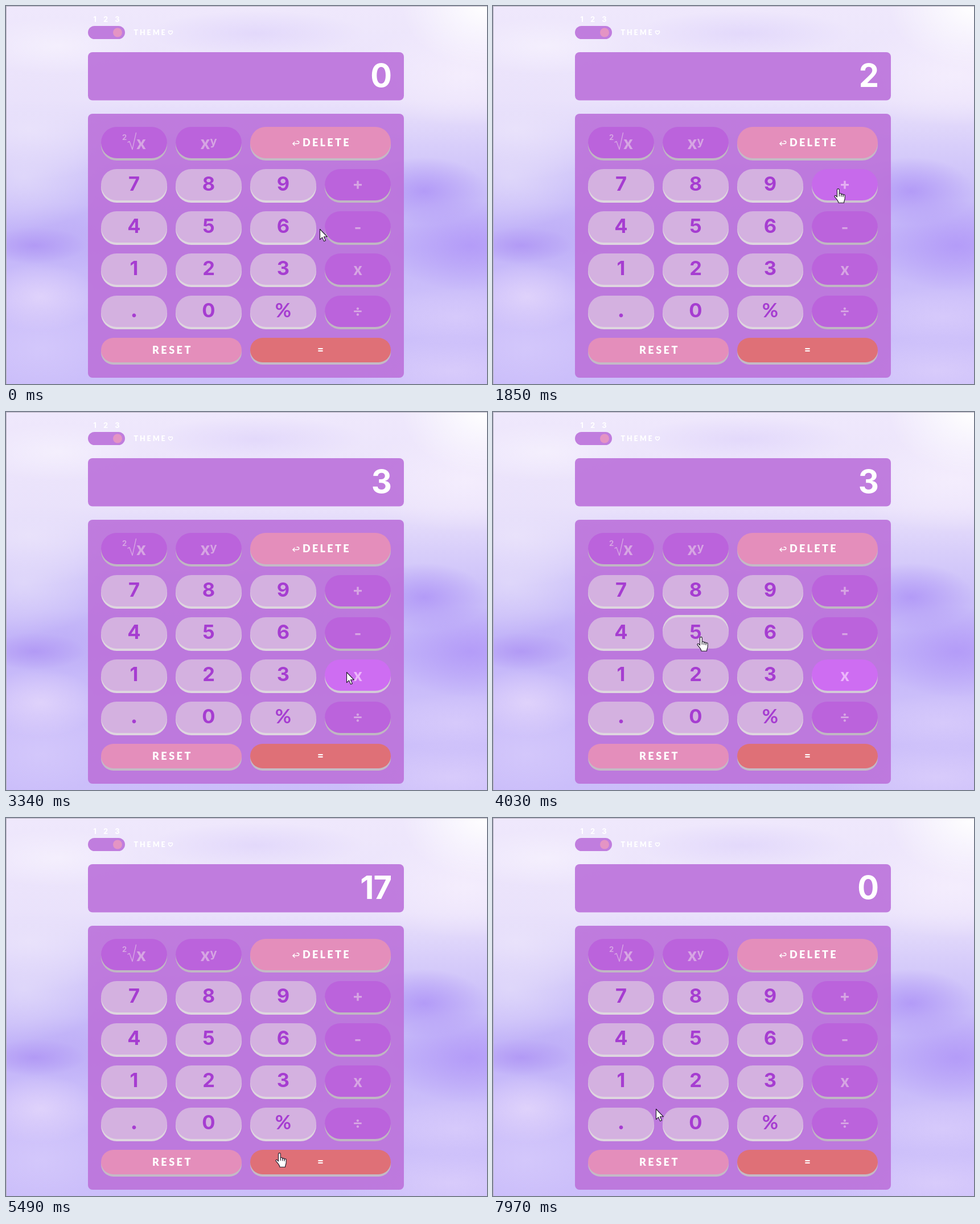
An HTML page for the animation above (8000 ms loop, 845x663 px).

```html
<!DOCTYPE html>
<html lang="en">
<head>
<meta charset="utf-8">
<title>Calculator</title>
<style>
html, body { margin: 0; width: 100%; height: 100%; overflow: hidden; }
body {
  background:
    linear-gradient(#b8b2c2, #b8b2c2) 0 0 / 100% 1px no-repeat,
    linear-gradient(#b8b2c2, #b8b2c2) 0 0 / 1px 100% no-repeat,
    radial-gradient(150px 110px at 845px 0, #fff, #fff0),
    radial-gradient(190px 40px at 440px 48px, #e3d9fb, #e3d9fb00),
    radial-gradient(150px 50px at 90px 70px, #f4effd, #f4effd00),
    radial-gradient(200px 90px at 810px 120px, #f4edfd, #f4edfd00),
    radial-gradient(190px 90px at 40px 215px, #e9e2fb, #e9e2fb00),
    radial-gradient(150px 90px at 30px 300px, #ded6fa, #ded6fa00),
    radial-gradient(90px 32px at 50px 420px, #b29af5, #b29af500),
    radial-gradient(130px 60px at 100px 405px, #bfaff7, #bfaff700),
    radial-gradient(100px 60px at 60px 510px, #dfd2fb, #dfd2fb00),
    radial-gradient(110px 60px at 735px 325px, #b39bf7, #b39bf700),
    radial-gradient(150px 80px at 815px 420px, #b49cf8, #b49cf800),
    radial-gradient(150px 50px at 790px 545px, #d6c9fb, #d6c9fb00),
    radial-gradient(200px 60px at 780px 640px, #d8cbfb, #d8cbfb00),
    radial-gradient(120px 70px at 60px 600px, #d3c7fb, #d3c7fb00),
    linear-gradient(#efe8fc, #eae2fb 25%, #d8cefa 37%, #c9bdf9 50%, #c3b5f9 64%, #cdc0fa 78%, #cbbefa);
}
svg { position: absolute; left: 0; top: 0; display: block; }
text { font-family: Inter, "Open Sans", sans-serif; font-weight: 700; }
.label { font-family: Lato, "Open Sans", sans-serif; font-weight: 900; fill: #fff; }
.lato { font-family: Lato, "Open Sans", sans-serif; }
.panel { fill: rgba(188, 114, 219, .9); }
.line { fill: none; stroke-linecap: round; stroke-linejoin: round; }
.cursor { fill: #fff; stroke: #1c1626; stroke-width: 1.1; stroke-linejoin: round; }
</style>
</head>
<body>
<svg id="stage" width="845" height="663" viewBox="0 0 845 663">
  <g fill="#fff" font-size="13" text-anchor="middle">
    <text x="156" y="27.500">1</text><text x="175" y="27.500">2</text><text x="195.500" y="27.500">3</text>
  </g>
  <rect class="panel" x="144" y="35" width="65" height="23" rx="11.500"/>
  <circle cx="196" cy="46.500" r="8" fill="#e494c4"/>
  <text class="label" x="224.500" y="50.500" font-size="12.500" letter-spacing="2.900">THEME</text>
  <path class="line" stroke="#fff" stroke-width="1.500" d="M289 49.800C283 46 285.500 41.500 289 44.300C292.500 41.500 295 46 289 49.800Z"/>
  <rect class="panel" x="144" y="81" width="555" height="84.500" rx="8"/>
  <text id="screen" x="677" y="142" font-size="56" text-anchor="end" letter-spacing="-1" fill="#fff">0</text>
  <rect class="panel" x="144" y="189" width="555" height="463" rx="8"/>
  <g id="keys"></g>
  <g id="pointer">
    <path id="arrow" class="cursor" d="M.5 .5V18.700L4.600 14.900L7.600 21.600L10.400 20.400L7.500 13.700H13.200Z"/>
    <g id="hand" transform="translate(-7 0)">
      <path class="cursor" d="M5.500 15V2.500a1.900 1.900 0 0 1 3.800 0V10a1.700 1.700 0 0 1 3.400 .4v.6a1.700 1.700 0 0 1 3.300 .4v.8a1.600 1.600 0 0 1 3.200 .5V17c0 3.500-1.700 4.500-1.700 8.200H8c0-2.200-1.500-3.700-3-6L1.200 14.700c-1-1.700 1-3.100 2.300-1.800z"/>
      <path class="cursor" style="fill:none" d="M9.300 10v4M12.700 11v3.500M16 12v3"/>
    </g>
  </g>
</svg>
<script>
const $ = id => document.getElementById(id);
const keys = {};
const cols = [167, 298, 429, 560];
const rows = [212, 286, 360, 434, 508, 582];
const kinds = {
  num: ['#d4b1e0', '#ded6df', '#a63dd1'],
  op: ['#bb63dc', '#c0b7c3', '#d6a5e3'],
  pink: ['#e48ebb', '#c4bac6', '#fff'],
  red: ['#df7077', '#c4bac6', '#fff']
};

function make(tag, attrs, parent, text) {
  const el = document.createElementNS('http://www.w3.org/2000/svg', tag);
  for (const a in attrs) el.setAttribute(a, attrs[a]);
  if (text) el.textContent = text;
  return parent.appendChild(el);
}

function addKey(name, kind, col, row, span = 1) {
  const [face, edge, ink] = kinds[kind];
  const x = cols[col], y = rows[row], w = span * 131 - 15, h = row === 5 ? 43 : 55;
  const g = make('g', { fill: ink }, $('keys'));
  const box = { x, width: w, height: h, rx: h / 2 };
  const shade = make('rect', { ...box, y: y + 4, fill: edge }, g);
  make('rect', { ...box, y, fill: face }, g);
  keys[name] = { g, shade, x, y, w, h };
  return g;
}

function put(g, text, x, y, size, attrs) {
  make('text', { x, y, 'font-size': size, 'text-anchor': 'middle', ...attrs }, g, text);
}

const root = addKey('root', 'op', 0, 0);
put(root, '2', 208, 235, 13);
put(root, 'x', 237.5, 251, 30);
make('path', { class: 'line', stroke: '#d6a5e3', 'stroke-width': 1.4, d: 'M214 239L217 237.500L222 251.500L228.500 222.500' }, root);

const power = addKey('power', 'op', 1, 0);
put(power, 'x', 350, 251, 30);
put(power, 'y', 364.5, 244, 20);

const del = addKey('delete', 'pink', 2, 0, 2);
put(del, 'DELETE', 521, 246, 18, { class: 'label', 'text-anchor': 'start', 'letter-spacing': 3.3 });
make('path', { class: 'line', stroke: '#fff', 'stroke-width': 1.4, d: 'M507 238.500L503.800 241.500L507 244.500M504 241.500H512.500A2.200 2.200 0 0 0 512.500 237H511' }, del);

['789', '456', '123', '.0%'].forEach((line, r) => [...line].forEach((ch, c) => {
  const g = addKey(ch, 'num', c, r + 1);
  const plain = ch >= '0' && ch <= '9';
  put(g, ch, cols[c] + 58, rows[r + 1] + 38, ch === '.' ? 44 : 34.5, plain ? {} : { class: 'lato' });
}));

[['+', 36], ['-', 38], ['x', 38], ['÷', 36]].forEach(([ch, dy], r) => {
  const g = addKey(ch === 'x' ? 'times' : ch, 'op', 3, r + 1);
  put(g, ch, 618, rows[r + 1] + dy, 28, ch === '÷' ? { style: 'font-weight:600' } : {});
});

put(addKey('reset', 'pink', 0, 5, 2), 'RESET', 257, 610, 18, { class: 'label', 'text-anchor': 'start', 'letter-spacing': 3.5 });
put(addKey('equals', 'red', 2, 5, 2), '=', 552.5, 610, 18, { class: 'label' });

// Pointer moves: start, end, steps, target x, target y
const moves = [
  [70, 540, 7, 381, 454],
  [930, 1700, 11, 606, 320],
  [2080, 2550, 7, 500, 463],
  [2870, 3105, 4, 598, 456],
  [3520, 3880, 6, 365, 394],
  [4260, 4810, 8, 488, 594],
  [5250, 5490, 4, 480, 587],
  [5950, 6570, 9, 304, 592],
  [7800, 7970, 3, 286, 510]
];
// Key presses: down, up, key
const presses = [
  [620, 700, '2'], [2630, 2720, '3'], [4030, 4110, '5'],
  [4970, 5020, 'equals'], [6870, 7020, 'reset']
];
const readings = [[0, '0'], [700, '2'], [2720, '3'], [4110, '5'], [5020, '17'], [7020, '0']];

const stepped = (t, start, end, n) =>
  t < start ? 0 : Math.min(n, Math.floor((t - start) * (n - 1) / (end - start) + 1e-6) + 1) / n;

function pointerAt(t) {
  let x = 551, y = 391;
  for (const [start, end, n, tx, ty] of moves) {
    const p = stepped(t, start, end, n);
    x += (tx - x) * p;
    y += (ty - y) * p;
  }
  return [x, y];
}

function draw(t) {
  $('screen').textContent = readings.filter(r => r[0] <= t).pop()[1];

  const swap = stepped(t, 3184, 3340, 3);
  const lit = {
    '+': stepped(t, 1770, 1930, 3) * (1 - swap),
    times: t < 5020 ? swap : 0
  };
  for (const k in lit) keys[k].g.style.filter = lit[k] ? `brightness(${1 + lit[k] * .1})` : 'none';

  for (const [down, up, k] of presses) {
    const { shade, y } = keys[k];
    shade.setAttribute('y', y + (t >= down && t < up ? -4 : 4));
  }

  const [x, y] = pointerAt(t);
  const over = Object.keys(keys).find(k => {
    const b = keys[k];
    return x >= b.x && x <= b.x + b.w && y >= b.y && y <= b.y + b.h;
  });
  const hand = over && lit[over] !== 1;
  $('hand').style.display = hand ? '' : 'none';
  $('arrow').style.display = hand ? 'none' : '';
  $('pointer').setAttribute('transform', `translate(${Math.round(x)} ${Math.round(y)})`);
}

const begin = performance.now();
function tick() {
  draw((performance.now() - begin) % 8000);
  requestAnimationFrame(tick);
}
tick();
</script>
</body>
</html>
```
